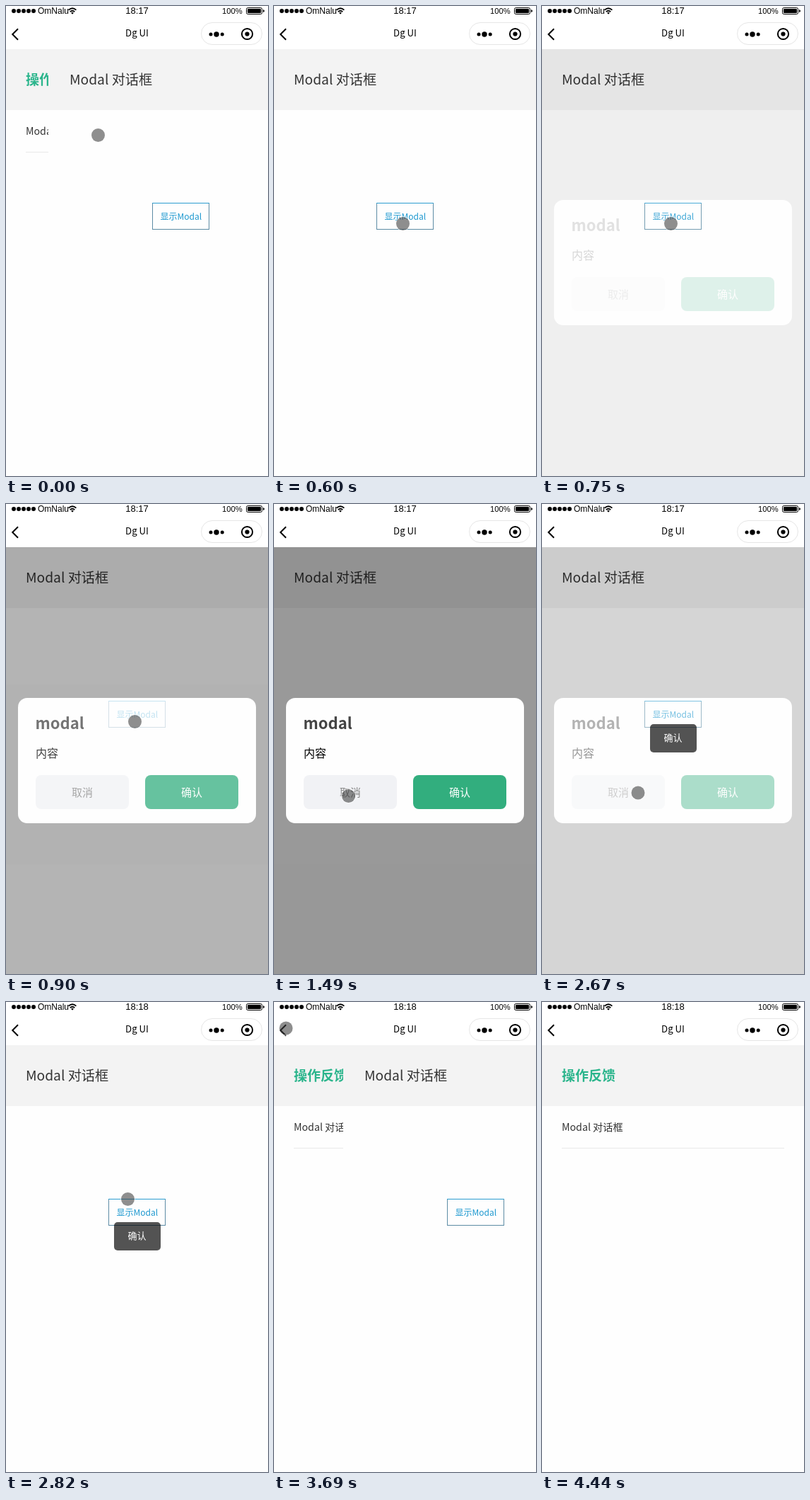
An HTML page for the animation above (4.9 s loop, 371 by 664 pixels).

```html
<!DOCTYPE html>
<html lang="zh-CN">
<head>
<meta charset="utf-8">
<title>Modal</title>
<style>
  html, body { margin: 0; width: 100%; height: 100%; overflow: hidden; background: #fefefe; }
  svg { display: block; width: 100%; height: 100%; }
  text { font-family: "Noto Sans CJK SC", "Noto Sans CJK", "Noto Sans", sans-serif; }
  .status text { font-family: "Liberation Sans", Arial, sans-serif; }
  .mid { text-anchor: middle; }
</style>
</head>
<body>
<svg viewBox="0 0 371 664">
  <g id="list">
    <rect y="61" width="371" height="603" fill="#fefefe"/>
    <rect y="61" width="371" height="86" fill="#f3f3f3"/>
    <text x="28" y="111" font-size="19" font-weight="700" fill="#2bb58c">操作反馈</text>
    <text x="28" y="182" font-size="14.2" fill="#333">Modal 对话框</text>
    <path d="M28 206.5H343" stroke="#e9e9e9"/>
  </g>

  <g id="detail">
    <rect x="-2" y="61" width="375" height="603" fill="#fefefe"/>
    <rect x="-2" y="61" width="375" height="86" fill="#f3f3f3"/>
    <text x="28" y="111" font-size="19.2" fill="#333">Modal 对话框</text>
    <rect x="145.5" y="278.5" width="80" height="37" fill="none" stroke="#5d8ca5"/>
    <path d="M145 278.5H226" stroke="#2c9dd0"/>
    <text class="mid" x="185.8" y="302.3" font-size="12" fill="#1a97cf">显示Modal</text>
  </g>

  <g id="modal">
    <rect y="61" width="371" height="603" fill="#000" fill-opacity=".4"/>
    <rect x="17" y="274" width="337" height="177" rx="13" fill="#fefefe"/>
    <text x="41.5" y="318" font-size="22" font-weight="700" fill="#444">modal</text>
    <text x="42" y="358" font-size="16" fill="#000">内容</text>
    <rect x="42" y="383" width="132" height="48" rx="8" fill="#f1f2f5"/>
    <text class="mid" x="108" y="412.5" font-size="15" fill="#888">取消</text>
    <rect x="197" y="383" width="132" height="48" rx="8" fill="#32ae7e"/>
    <text class="mid" x="263" y="412.5" font-size="15" font-weight="500" fill="#fff">确认</text>
  </g>

  <g id="toast">
    <rect x="153" y="311" width="66" height="40" rx="5" fill="#000" fill-opacity=".67"/>
    <text class="mid" x="185.5" y="335" font-size="13" font-weight="500" fill="#fff">确认</text>
  </g>

  <g class="status">
    <rect width="371" height="61" fill="#fff"/>
    <path d="M11 7H39.1" stroke="#000" stroke-width="6" stroke-linecap="round" stroke-dasharray="0 7"/>
    <text x="45" y="11" font-size="12">OmNalu</text>
    <path d="M88.6 5.7Q94 .9 99.4 5.7M90.7 8.2Q94 5.2 97.3 8.2" fill="none" stroke="#000" stroke-width="1.8"/>
    <path d="M92.1 9.6Q94 8 95.9 9.6L94 11.8Z"/>
    <text id="clock" class="mid" x="185.5" y="11" font-size="13">18:17</text>
    <text x="306" y="11" font-size="11.2">100%</text>
    <rect x="340.5" y="2.5" width="22" height="9" rx="2" fill="none" stroke="#000"/>
    <rect x="342" y="4" width="19" height="6" rx=".8"/>
    <path d="M364 5q2 .3 2 2t-2 2z"/>
  </g>
  <g>
    <path d="M17 32.2L9.2 40L17 47.8" fill="none" stroke="#000" stroke-width="2"/>
    <text class="mid" x="185.5" y="43" font-size="13.2" font-weight="500">Dg UI</text>
    <rect x="276.5" y="23.5" width="86" height="31" rx="15.5" fill="#fff" stroke="#e6e6e6"/>
    <circle cx="290" cy="40" r="2.5"/>
    <circle cx="298" cy="40" r="3.7"/>
    <circle cx="306.2" cy="40" r="2.5"/>
    <circle cx="341.5" cy="39.5" r="7.6" fill="none" stroke="#000" stroke-width="2"/>
    <circle cx="341.5" cy="39.5" r="3.1"/>
  </g>

  <g id="cursor">
    <circle r="10" fill="none" stroke="#fff" stroke-opacity=".7"/>
    <circle r="9.5" fill="#3c3c3c" fill-opacity=".58"/>
  </g>
</svg>
<script>
  const LOOP = 4900, TICK = 147.6;
  const [detail, modal, toast, cursor, clock] =
    ['detail', 'modal', 'toast', 'cursor', 'clock'].map(id => document.getElementById(id));

  // Cursor stops: tick, x, y
  const path = [
    [0, 130.5, 182.5], [1, 136, 200], [4, 182.5, 307.5], [6, 182.5, 307.5],
    [9, 104, 410], [10, 105.5, 412.5], [12, 232, 412], [13, 248, 411],
    [14, 246, 411], [16, 133.5, 416.5], [17, 133.5, 416.5], [18, 136, 408],
    [19, 172.5, 278.5], [21, 62, 88], [23, 17, 37], [25, 17, 37],
    [27, 48, 150], [29, 158, 627]
  ];

  function cursorAt(n) {
    const i = path.findIndex(stop => stop[0] >= n);
    if (i < 1) return path[0].slice(1);
    const [n0, x0, y0] = path[i - 1], [n1, x1, y1] = path[i];
    const k = (n - n0) / (n1 - n0);
    return [x0 + (x1 - x0) * k, y0 + (y1 - y0) * k];
  }

  const pageOffset = n => n > 25 ? 375 : { 0: 62, 1: 5, 25: 100 }[n] ?? 0;
  const modalAlpha = n => n < 5 || n > 18 ? 0 : { 5: .15, 6: .74, 18: .4 }[n] ?? 1;
  const toastAlpha = n => n >= 14 && n < 24 ? 1 : 0;
  const move = (el, x, y) => el.setAttribute('transform', `translate(${x} ${y})`);
  const fade = (el, opacity) => el.setAttribute('opacity', opacity);

  function draw(time) {
    const n = Math.floor(time % LOOP / TICK);
    fade(cursor, n < 30 ? 1 : 0);
    move(cursor, ...cursorAt(n));
    move(detail, pageOffset(n), 0);
    fade(modal, modalAlpha(n));
    fade(toast, toastAlpha(n));
    clock.textContent = n < 19 ? '18:17' : '18:18';
  }

  const start = performance.now();
  function tick() {
    draw(performance.now() - start);
    requestAnimationFrame(tick);
  }
  tick();
</script>
</body>
</html>
```
